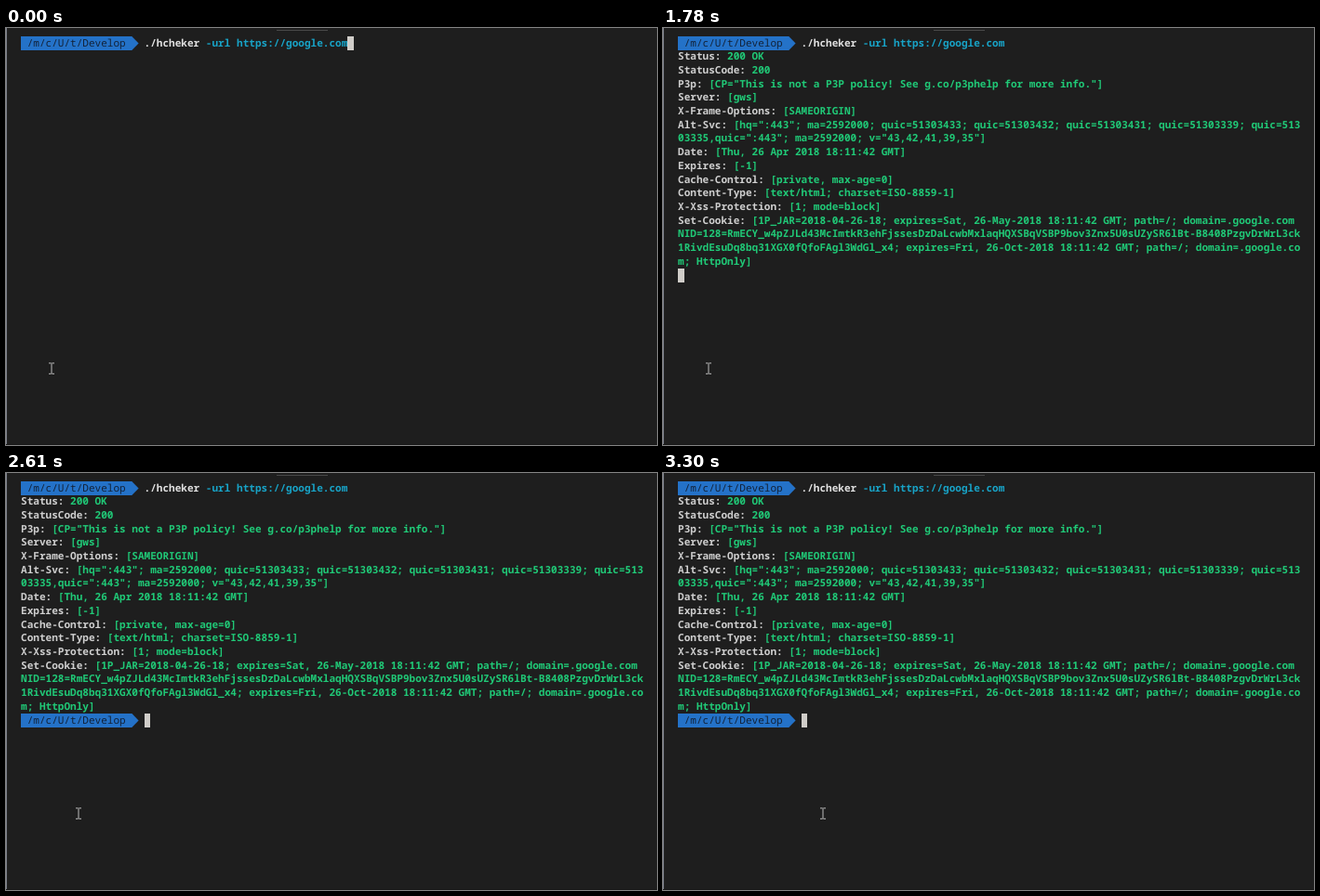
Animation, 700 px wide and 449 px high, one loop 3450 ms. Source, as an HTML page:

```html
<!DOCTYPE html>
<html lang="en">
<head>
<meta charset="utf-8">
<title>Terminal</title>
<style>
  html, body { margin: 0; width: 100%; height: 100%; overflow: hidden; background: #1e1e1e; }
  #stage { position: relative; width: 700px; height: 449px; overflow: hidden; background: #1e1e1e; }
  #stage > * { position: absolute; }
  #edge { left: 0; top: 0; width: 1px; height: 449px; background: #7a7f8a; }
  #base { left: 0; top: 448px; width: 700px; height: 1px; background: #181818; }
  #handle { left: 291px; top: 2px; width: 55px; height: 1px; background: #484848; }
  #term {
    left: 16px; top: 9px;
    font: 600 11.05px/14.7px "Noto Sans Mono", "DejaVu Sans Mono", monospace;
    font-variant-ligatures: none;
    text-rendering: geometricPrecision;
    white-space: pre; color: #cfcfcf;
  }
  #term > * { position: absolute; left: 0; }
  .prompt {
    width: 19.1ch; height: 15px; line-height: 15.7px;
    background: #2472c8; color: #13233a; font-weight: 400;
    clip-path: polygon(0 0, 18ch 0, 100% 50%, 18ch 100%, 0 100%);
  }
  .command { top: .5px; margin-left: 20ch; color: #e2e2e2; }
  .arg { color: #18a3c7; }
  .value { color: #20c977; }
  #output { top: 15.2px; }
  #block { width: 1ch; height: 15px; background: #d0cdc9; }
  #mouse { left: 0; top: 360px; }
</style>
</head>
<body>
<div id="stage">
  <div id="edge"></div>
  <div id="base"></div>
  <div id="handle"></div>
  <div id="term">
    <span class="prompt" style="top:0"> /m/c/U/t/Develop </span>
    <span class="command">./hcheker <span class="arg">-url https://google.com</span></span>
    <div id="output"></div>
    <span class="prompt" id="next"> /m/c/U/t/Develop </span>
    <div id="block"></div>
  </div>
  <svg id="mouse" width="7" height="13" fill="none" stroke="#bcbcbc">
    <path d="M0 .9H2.7M3.3 .9H6M3 1.2V12M0 12.3H2.7M3.3 12.3H6"/>
  </svg>
</div>
<script>
const LOOP = 3450, LINE = 14.7;
const $ = id => document.getElementById(id);

const lines = `Status: 200 OK
StatusCode: 200
P3p: [CP="This is not a P3P policy! See g.co/p3phelp for more info."]
Server: [gws]
X-Frame-Options: [SAMEORIGIN]
Alt-Svc: [hq=":443"; ma=2592000; quic=51303433; quic=51303432; quic=51303431; quic=51303339; quic=513
03335,quic=":443"; ma=2592000; v="43,42,41,39,35"]
Date: [Thu, 26 Apr 2018 18:11:42 GMT]
Expires: [-1]
Cache-Control: [private, max-age=0]
Content-Type: [text/html; charset=ISO-8859-1]
X-Xss-Protection: [1; mode=block]
Set-Cookie: [1P_JAR=2018-04-26-18; expires=Sat, 26-May-2018 18:11:42 GMT; path=/; domain=.google.com
NID=128=RmECY_w4pZJLd43McImtkR3ehFjssesDzDaLcwbMxlaqHQXSBqVSBP9bov3Znx5U0sUZySR6lBt-B8408PzgvDrWrL3ck
1RivdEsuDq8bq31XGX0fQfoFAgl3WdGl_x4; expires=Fri, 26-Oct-2018 18:11:42 GMT; path=/; domain=.google.co
m; HttpOnly]`.split("\n");

$("output").innerHTML = lines
  .map(line => line.replace(/^([\w-]+: )?(.*)$/, '$1<span class="value">$2</span>'))
  .join("\n");

const lastRow = lines.length + 1;
$("next").style.top = lastRow * LINE + "px";

// Each step: start time, then the value held from there on.
const blockSteps = [[0, [53, 0]], [840, [0, 1]], [1780, [0, lastRow]], [1920, [20, lastRow]]];
const mouseSteps = [[0, 45.5], [2610, 75], [2730, 136], [2870, 152], [3300, 169]];
const held = (steps, t) => steps.filter(([start]) => start <= t).pop()[1];
const show = (id, on) => $(id).style.visibility = on ? "visible" : "hidden";

function render(t) {
  const [col, row] = held(blockSteps, t);
  $("block").style.left = col + "ch";
  $("block").style.top = row * LINE + "px";
  $("mouse").style.left = held(mouseSteps, t) + "px";
  show("output", t >= 1780);
  show("next", t >= 1920);
}

const begin = performance.now();
function tick() {
  render((performance.now() - begin) % LOOP);
  requestAnimationFrame(tick);
}
tick();
</script>
</body>
</html>
```
